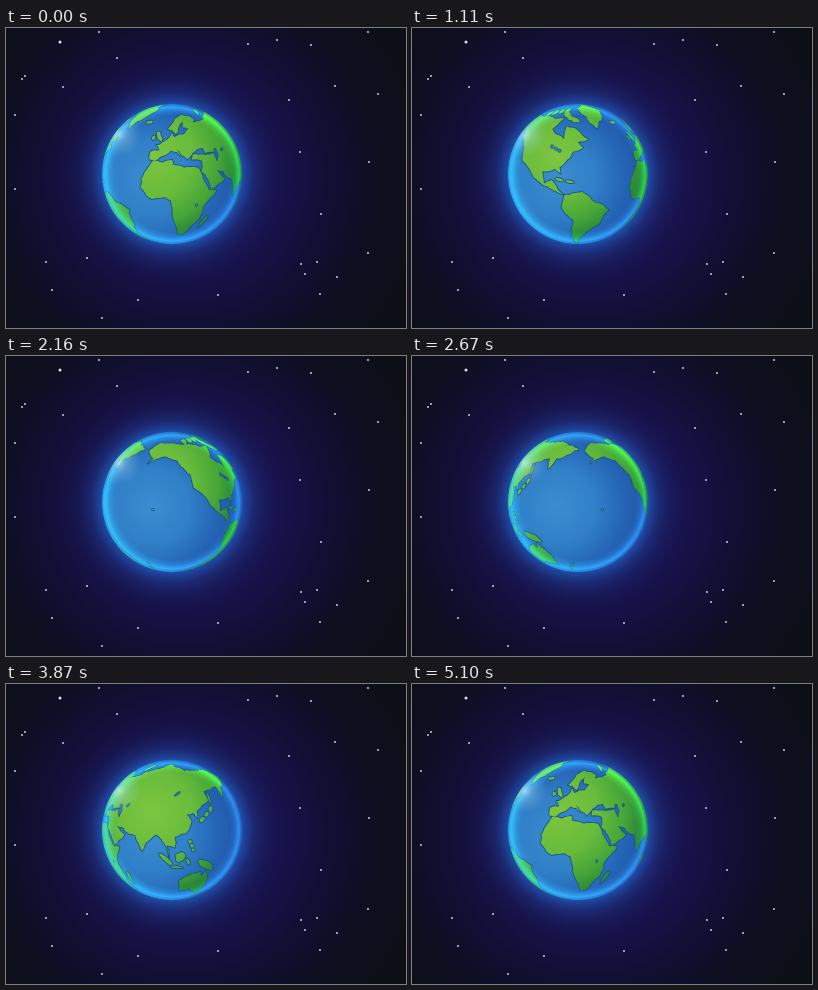
Recreate the animation shown at these times as an HTML page with a canvas. Size 400 by 300 pixels, loop 5.13 s.

```html
<!DOCTYPE html>
<html lang="en">
<head>
<meta charset="utf-8">
<title>Rotating globe</title>
<style>
html, body { margin: 0; width: 100%; height: 100%; overflow: hidden; background: #10111c; }
canvas { display: block; width: 400px; height: 300px; }
</style>
</head>
<body>
<canvas id="stage" width="400" height="300"></canvas>
<script>
const ctx = document.getElementById('stage').getContext('2d');
const CX = 166, CY = 146, R = 70;
const LOOP = 5130, TICK = 30, STEPS = 137;
const FIRST_LON = 10, TURN = 357;
const RAD = Math.PI / 180;

let seed = 7;
function random() {
  seed = (seed * 16807) % 2147483647;
  return seed / 2147483647;
}

// Latitude on a Miller map, leaned towards the viewer on the ball.
function tilt(lat) {
  const miller = 1.25 * Math.log(Math.tan(Math.PI / 4 + 0.4 * lat * RAD));
  return 0.95 * miller - 25 * RAD;
}

function place([lon, lat]) {
  const angle = tilt(lat);
  return { lon, r: R * Math.cos(angle), y: CY - R * Math.sin(angle) };
}

// Split an edge at a nudged midpoint until the pieces are short.
function roughen(a, b, out) {
  const dx = b[0] - a[0], dy = b[1] - a[1];
  if (Math.hypot(dx, dy) < 3) {
    out.push(a);
    return;
  }
  const k = (random() - 0.5) * 0.2;
  const mid = [(a[0] + b[0]) / 2 - dy * k, (a[1] + b[1]) / 2 + dx * k];
  roughen(a, mid, out);
  roughen(mid, b, out);
}

function coast(points) {
  const out = [];
  points.forEach((p, i) => roughen(p, points[(i + 1) % points.length], out));
  return out.map(place);
}

const lands = [], lakes = [];

function land(...flat) {
  const points = [];
  for (let i = 0; i < flat.length; i += 2) points.push([flat[i], flat[i + 1]]);
  lands.push(coast(points));
}

// A row of long blobs between two places: islands or lakes.
function chain(list, lon0, lat0, lon1, lat1, count, width) {
  const dx = (lon1 - lon0) / count, dy = (lat1 - lat0) / count;
  const len = Math.hypot(dx, dy), half = len * (count > 1 ? 0.42 : 0.5);
  for (let i = 0; i < count; i++) {
    const ring = [];
    for (let k = 0; k < 9; k++) {
      const a = k / 9 * 2 * Math.PI, size = 0.8 + 0.4 * random();
      const u = Math.cos(a) * half * size / len, v = Math.sin(a) * width / 2 * size / len;
      ring.push([lon0 + dx * (i + 0.5 + u) - dy * v, lat0 + dy * (i + 0.5 + u) + dx * v]);
    }
    list.push(coast(ring));
  }
}

// Africa
land(-6,36, 10,37, 11,33, 20,31, 32,31, 38,19, 43,12, 51,12, 40,-4, 40,-16, 35,-22, 27,-34,
  19,-35, 12,-17, 9,3, 4,6, -8,4, -17,14, -16,22, -10,31);
// Europe
land(-9,37, -9,43, -1,44, -4,48, 8,54, 10,57, 12,54, 22,56, 28,60, 22,61, 24,66, 17,61, 14,56,
  10,59, 5,60, 14,68, 26,71, 40,67, 36,65, 44,66, 62,69, 60,44, 40,42, 38,46, 33,45, 28,42,
  23,37, 14,45, 18,40, 9,44, 0,39, -5,36);
// Near East
land(60,48, 62,25, 50,29, 59,22, 45,13, 35,28, 36,36, 27,37, 28,41, 42,41);
// Asia
land(58,69, 72,72, 103,77, 130,71, 178,69, 186,66, 176,62, 162,59, 156,51, 154,59, 134,55,
  136,48, 123,40, 123,35, 120,39, 114,38, 118,32, 113,23, 104,20, 104,11, 97,13, 99,2, 94,16,
  88,22, 79,15, 75,8, 70,21, 58,26);
// Australia
land(110,-22, 126,-14, 132,-12, 136,-17, 138,-11, 149,-26, 146,-38, 128,-32, 112,-35);
// North America
land(-167,65, -156,71, -128,70, -95,68, -84,69, -94,60, -81,54, -79,52, -78,62, -66,59, -56,52,
  -66,50, -61,46, -70,43, -76,35, -81,31, -80,26, -85,30, -96,28, -95,18, -88,21, -83,13,
  -78,8, -94,16, -105,23, -111,31, -120,37, -122,47, -133,57, -148,60, -163,55, -158,59);
// Greenland
land(-45,60, -54,70, -70,78, -35,83, -20,75, -38,66);
// South America
land(-77,8, -62,11, -50,1, -35,-6, -40,-21, -48,-27, -58,-37, -65,-44, -67,-55, -74,-50,
  -70,-18, -81,-5);

chain(lands, -5, 58, 0, 51, 1, 4);        // Britain
chain(lands, -9, 52, -7, 55, 1, 3);       // Ireland
chain(lands, -24, 65, -14, 65, 1, 2.5);   // Iceland
chain(lands, 53, 71, 66, 77, 1, 3);       // Novaya Zemlya
chain(lands, 49, -12, 45, -25, 1, 4);     // Madagascar
chain(lands, 125, 32, 139, 44, 3, 3);     // Japan
chain(lands, 138, 46, 138, 54, 1, 2);     // Sakhalin
chain(lands, 116, 18, 121, 7, 3, 3);      // Philippines
chain(lands, 91, 5, 102, -6, 1, 3.5);     // Sumatra
chain(lands, 100, -7, 112, -8, 1, 2);     // Java
chain(lands, 105, 0, 113, 5, 1, 8);       // Borneo
chain(lands, 115, 1, 118, -5, 1, 3);      // Sulawesi
chain(lands, 126, -1, 146, -9, 1, 6);     // New Guinea
chain(lands, 177, -36, 168, -46, 2, 3);   // New Zealand
chain(lands, -155, 20, -154, 19, 1, 1);   // Hawaii
chain(lands, -85, 22, -68, 18.5, 2, 2);   // Antilles
chain(lands, -64, 65, -88, 73, 1, 5);     // Baffin
chain(lands, -124, 72, -80, 76, 4, 4);    // Arctic islands
chain(lakes, 51, 46, 51, 37, 1, 4);       // Caspian
chain(lakes, 58, 44, 61, 46, 1, 2);       // Aral
chain(lakes, 104, 52, 110, 55, 1, 1.5);   // Baikal
chain(lakes, 33, 0, 33, -3, 1, 2);        // Victoria
chain(lakes, -91, 47.5, -80, 43, 3, 2.5); // Great Lakes

function radial(x, y, r0, r1, ...stops) {
  const g = ctx.createRadialGradient(x, y, r0, x, y, r1);
  stops.forEach(([at, color]) => g.addColorStop(at, color));
  return g;
}

function disc(x, y, r, fill) {
  ctx.fillStyle = fill;
  ctx.beginPath();
  ctx.arc(x, y, r, 0, 2 * Math.PI);
  ctx.fill();
}

const sky = radial(178, 150, 40, 245,
  [0, '#1c1862'], [0.25, '#18134f'], [0.5, '#120f36'], [0.75, '#0e0e20'], [1, '#0d0f17']);
const halo = radial(CX, CY, 66, 112,
  [0, 'rgba(38,120,225,.9)'], [0.12, 'rgba(34,92,190,.7)'], [0.35, 'rgba(30,62,145,.45)'],
  [0.65, 'rgba(28,42,110,.2)'], [1, 'rgba(26,26,90,0)']);
const sea = radial(146, 150, 0, 92,
  [0, '#3b8dd0'], [0.4, '#3180c8'], [0.7, '#2566b6'], [1, '#2151a4']);
const grass = radial(146, 128, 0, 102,
  [0, '#7dc640'], [0.4, '#68bb3c'], [0.65, '#46a638'], [0.85, '#257f38'], [1, '#1f7436']);
const rim = radial(CX, CY, 58, R,
  [0, 'rgba(50,85,70,0)'], [0.35, 'rgba(50,85,70,.3)'],
  [0.75, 'rgba(60,105,80,1)'], [1, 'rgba(30,50,40,.5)']);
const leftRim = radial(CX + 6, CY - 1, 60, R + 6,
  [0, 'rgba(45,180,240,0)'], [0.5, 'rgba(45,180,240,.18)'], [1, 'rgba(45,185,245,.75)']);
const shine = radial(113, 107, 0, 22,
  [0, 'rgba(220,245,250,.6)'], [0.3, 'rgba(190,230,240,.32)'], [1, 'rgba(150,215,240,0)']);

const stars = [
  [54,14], [93,4], [19,48], [16,51], [57,59], [111,30], [242,16], [271,12], [305,17], [329,58],
  [283,72], [362,4], [372,66], [363,134], [294,124], [9,87], [9,161], [315,186], [362,225],
  [81,230], [40,234], [46,262], [132,272], [212,267], [295,236], [299,246], [311,234],
  [331,249], [314,266], [96,290]
];

function trace(shape, center) {
  let seen = false;
  ctx.beginPath();
  for (const turn of [-360, 0, 360]) {
    const shift = turn - center;
    if (!shape.some(p => Math.abs(p.lon + shift) < 90)) continue;
    seen = true;
    shape.forEach((p, i) => {
      const d = Math.max(-90, Math.min(90, p.lon + shift));
      const x = CX + p.r * Math.sin(d * RAD);
      if (i) ctx.lineTo(x, p.y); else ctx.moveTo(x, p.y);
    });
    ctx.closePath();
  }
  return seen;
}

function draw(center) {
  ctx.fillStyle = sky;
  ctx.fillRect(0, 0, 400, 300);
  stars.forEach(([x, y], i) => disc(x, y, i ? 0.9 : 1.5, 'rgba(235,238,255,.95)'));
  disc(CX, CY, 112, halo);

  ctx.save();
  ctx.beginPath();
  ctx.arc(CX, CY, R, 0, 2 * Math.PI);
  ctx.clip();
  disc(CX, CY, R, sea);
  ctx.lineJoin = 'round';
  ctx.strokeStyle = '#1a5584';
  ctx.lineWidth = 1.8;
  for (const shape of lands) if (trace(shape, center)) ctx.stroke();
  ctx.fillStyle = grass;
  for (const shape of lands) if (trace(shape, center)) ctx.fill();
  ctx.fillStyle = sea;
  ctx.lineWidth = 0.8;
  for (const shape of lakes) {
    if (!trace(shape, center)) continue;
    ctx.fill();
    ctx.stroke();
  }
  ctx.globalCompositeOperation = 'color-dodge';
  disc(CX, CY, R, rim);
  ctx.globalCompositeOperation = 'source-over';
  disc(CX, CY, R, leftRim);
  disc(113, 107, 22, shine);
  ctx.restore();
}

const start = performance.now();

function frame() {
  const tick = Math.floor((performance.now() - start) % LOOP / TICK);
  const step = Math.floor(tick / 1.25);
  draw(FIRST_LON - TURN * step / STEPS);
  requestAnimationFrame(frame);
}
frame();
</script>
</body>
</html>
```
